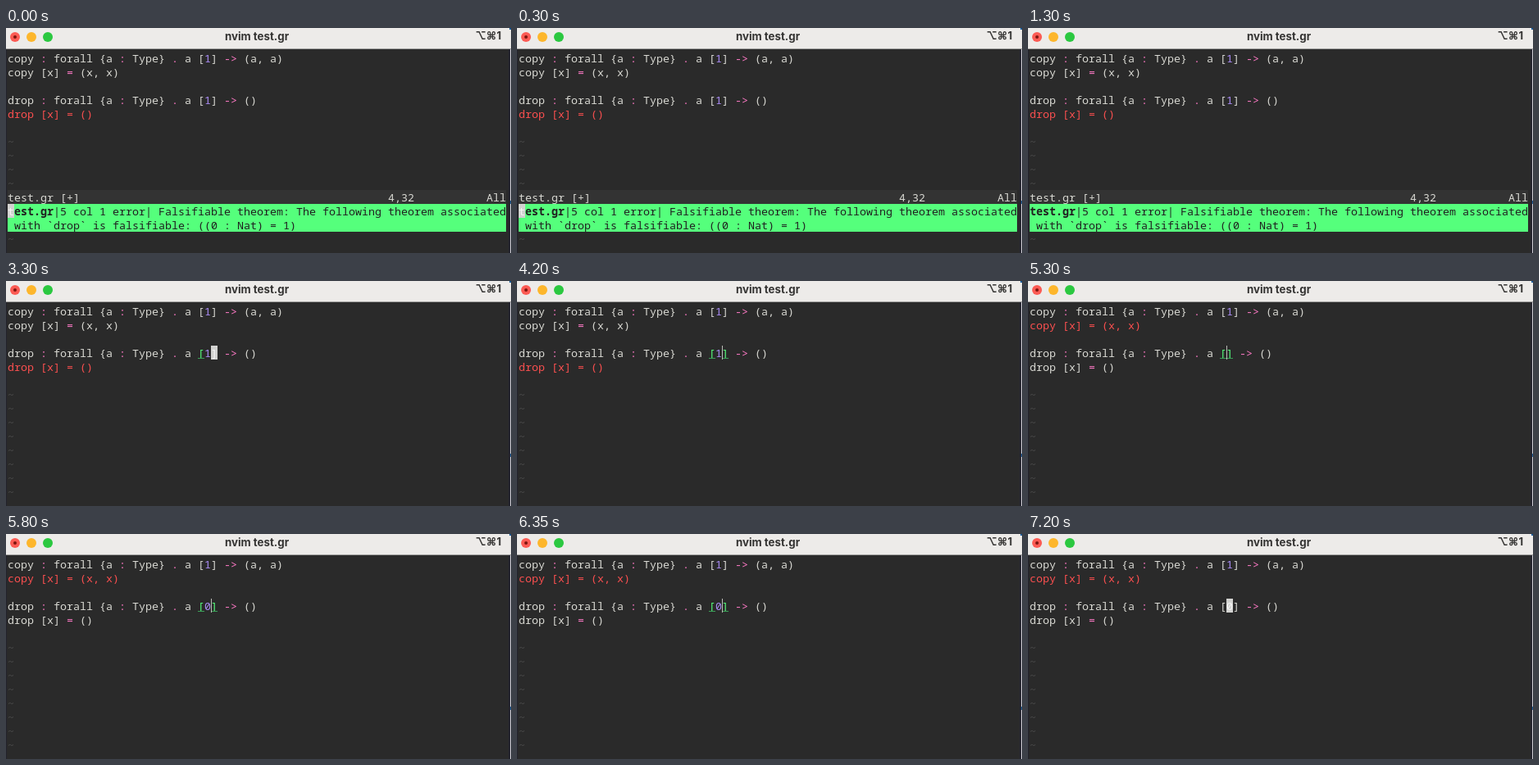
Write an HTML page with a canvas that moves like this. It is 616 by 275 pixels and loops after 8 s.

```html
<!DOCTYPE html>
<html lang="en">
<head>
<meta charset="utf-8">
<title>nvim test.gr</title>
<style>
  html, body { margin: 0; width: 616px; height: 275px; overflow: hidden; background: #2a2a2a; }
  canvas { display: block; }
</style>
</head>
<body>
<canvas id="stage" width="616" height="275"></canvas>
<script>
const ctx = document.getElementById('stage').getContext('2d');
const LOOP = 8000, CELL = 8, ROW = 17, LEFT = 2, TOP = 28;
const MONO = '13.333px "Noto Sans Mono", "DejaVu Sans Mono", monospace';
const C = {
  bg: '#2a2a2a', bar: '#edebe9', fg: '#d8d8d2', pink: '#ff79c6', purple: '#a98bf5',
  green: '#55ff7c', red: '#f94f4f', tilde: '#4c4c4c', status: '#333333', block: '#d2d2d0',
  shade: '#23232d', edge: '#cfced6', blue: '#1f5f9c'
};

const colX = col => LEFT + col * CELL;
const rowY = row => TOP + row * ROW;

function rect(x, y, w, h, color) {
  ctx.fillStyle = color;
  ctx.fillRect(x, y, w, h);
}

function disc(x, y, r, color) {
  ctx.fillStyle = color;
  ctx.beginPath();
  ctx.arc(x, y, r, 0, Math.PI * 2);
  ctx.fill();
}

function text(row, col, str, color = C.fg, weight = 400) {
  ctx.font = `${weight} ${MONO}`;
  ctx.fillStyle = color;
  [...str].forEach((ch, i) => ctx.fillText(ch, colX(col + i), rowY(row) + 14));
}

// Operators pink, digits purple; a line with an error is all red.
function code(row, str, error) {
  if (error) return text(row, 0, str, C.red);
  for (const m of str.matchAll(/->|[:.=]|\d|[^\d:.=-]+/g)) {
    const operator = /^[-:.=]/.test(m[0]);
    const color = operator ? C.pink : /^\d/.test(m[0]) ? C.purple : C.fg;
    text(row, m.index, m[0], color, operator ? 500 : 400);
  }
}

function bracket(col, ch) {
  rect(colX(col), rowY(3), CELL, ROW, C.bg);
  text(3, col, ch, C.green, 500);
  rect(colX(col), rowY(3) + 15, CELL, 1, '#3c9e58');
}

function block(row, col, ch) {
  rect(colX(col), rowY(row), CELL, ROW, C.block);
  text(row, col, ch, '#f6f6f6');
}

function titleBar() {
  rect(0, 0, 616, 25, C.bar);
  rect(0, 25, 616, 1, '#9a9998');
  disc(11, 11, 6, '#fc5b54');
  disc(11, 11, 2, '#7d150f');
  disc(31, 11, 6, '#fdb62c');
  disc(51, 11, 6, '#2bc840');
  ctx.fillStyle = '#343332';
  ctx.font = '700 13.3px Inter, "Open Sans", sans-serif';
  ctx.textAlign = 'center';
  ctx.fillText('nvim test.gr', 306, 15);
  ctx.font = '700 13px Inter, "DejaVu Sans", sans-serif';
  ctx.textAlign = 'right';
  ctx.fillText('⌥⌘1', 604, 14);
  ctx.textAlign = 'left';
}

function windowEdges() {
  rect(0, 26, 1, 249, C.shade);
  rect(613, 26, 2, 249, C.shade);
  rect(615, 26, 1, 249, C.edge);
  rect(615, 211, 1, 4, C.blue);
  rect(614, 0, 2, 2, C.blue);
}

function errorList(cursor) {
  rect(LEFT, rowY(10), 608, ROW, C.status);
  text(10, 0, 'test.gr [+]');
  text(10, 58, '4,32');
  text(10, 73, 'All');
  rect(LEFT, rowY(11), 608, ROW * 2, C.green);
  text(11, 0, 'test.gr', '#202020', 700);
  text(11, 7, '|5 col 1 error| Falsifiable theorem: The following theorem associated', '#202020');
  text(12, 1, 'with `drop` is falsifiable: ((0 : Nat) = 1)', '#202020');
  if (cursor) block(11, 0, 't');
}

function draw(t) {
  const listOpen = t < 3300;
  const grade = t < 4400 ? '1' : t < 5800 ? '' : '0';
  const close = 30 + grade.length;
  const copyError = t >= 5300 && !(t >= 6250 && t < 6350);

  rect(0, 0, 616, 275, C.bg);
  titleBar();
  windowEdges();

  code(0, 'copy : forall {a : Type} . a [1] -> (a, a)');
  code(1, 'copy [x] = (x, x)', copyError);
  code(3, `drop : forall {a : Type} . a [${grade}] -> ()`);
  code(4, 'drop [x] = ()', t < 5300);
  for (let row = 6; row < 14; row++) {
    if (!listOpen || row < 10 || row > 12) text(row, 0, '~', C.tilde);
  }

  if (listOpen) return errorList(t < 1300);
  if (t >= 7200) return block(3, 30, '0');
  bracket(29, '[');
  if (t < 4200) return block(3, 31, ']');
  bracket(close, ']');
  rect(colX(close), rowY(3), 1, ROW, '#bcbcb8');
}

function tick() {
  draw(performance.now() % LOOP);
  requestAnimationFrame(tick);
}
tick();
</script>
</body>
</html>
```
